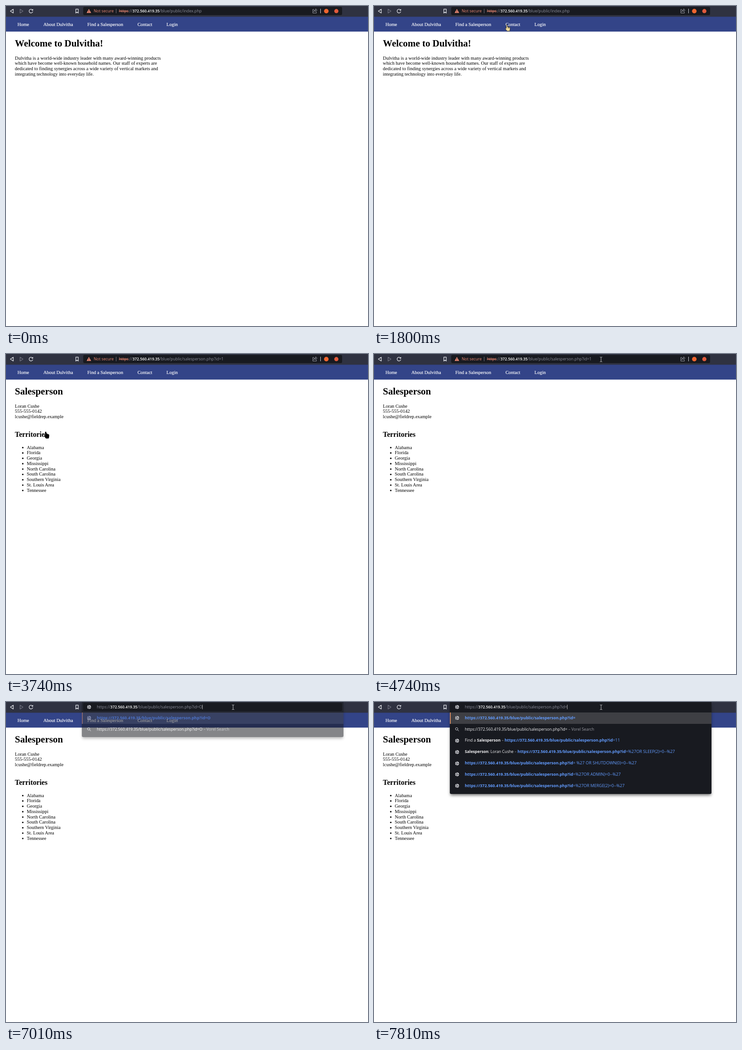
An HTML page that plays this animation: 797x703 px, repeating every 8000 ms.

```html
<!DOCTYPE html>
<html lang="en">
<head>
<meta charset="utf-8">
<title>Browser session</title>
<style>
html, body { margin: 0; width: 100%; height: 100%; overflow: hidden; background: #fff; }
[hidden] { display: none !important; }
#stage { position: relative; width: 797px; height: 703px; overflow: hidden; background: #fff; white-space: nowrap; }
#stage > *, #sheet > *, .abs { position: absolute; }

/* The web page is laid out at normal size and shown scaled down. */
#sheet { left: 0; top: 0; width: 1220px; height: 1080px; transform: scale(.654); transform-origin: 0 0;
  font: 16px/18px "Liberation Serif", serif; color: #000; }
#bar { left: 0; top: 0; width: 100%; height: 36px; background: #2f3241; }
#nav { left: 0; top: 30px; width: 100%; height: 56px; background: #334488; color: #fff; -webkit-text-stroke: .25px #fff; }
#nav span { position: relative; top: 23px; margin-left: 48px; }
#nav span:first-child { margin-left: 38.5px; }

.page { left: 30px; top: 107.44px; }
h1 { font-size: 32px; line-height: 37px; margin: 0 0 21.44px; }
h2 { font-size: 24px; line-height: 27px; margin: 19.92px 0; }
p { margin: 0 0 16px; }
ul { margin: 0; padding-left: 40px; }
.states ul { list-style: square; margin-bottom: 16px; }
u { color: #00e; }

.ui { font: 8.75px/12px "Open Sans", sans-serif; }
#popup { left: 167px; top: 0; width: 576px; background: #181a20; padding: 22.8px 0 5px;
  box-sizing: border-box; box-shadow: 0 4px 6px -1px rgba(0,0,0,.55); border-radius: 0 0 3px 3px; }
.row { position: relative; height: 24.85px; line-height: 24.85px; padding-left: 33px; color: #f2f2f4; font-size: 8.68px; }
.row:first-child { background: #3e3f44; box-shadow: inset 2px 0 #cf875e; }
.row svg { position: absolute; left: 10.5px; top: 7.4px; }
.row em { font-style: normal; color: #9a9ba3; }
.row q { quotes: none; color: #639cff; font-size: 9.1px; }
.row q b { font-size: 8.85px; }
#field { left: 170px; top: 2px; width: 570px; height: 18px; box-sizing: border-box;
  background: #181a20; border-radius: 3px; }
#field.focus { box-shadow: inset 0 0 0 1.2px #a3442f; }
#url { top: 3px; color: #8d8f9b; }
#url .host { color: #fff; font-size: 8.4px; font-weight: 600; }
#url.warn .scheme { color: #ee8a74; text-decoration: line-through; }
#url .picked, #url .picked span { background: #1b5fc1; color: #fff; }
#caret { display: inline-block; width: .7px; height: 10px; margin-right: -.7px; vertical-align: -2px; background: #aaa; }
#cursor { left: 0; top: 0; overflow: visible; }
</style>
</head>
<body>
<div id="stage">
  <div id="sheet">
    <div id="nav"></div>
    <div id="bar"></div>
    <div id="home" class="page">
      <h1>Welcome to Dulvitha!</h1>
      <p>Dulvitha is a world-wide industry leader with many award-winning products<br>
      which have become well-known household names. Our staff of experts are<br>
      dedicated to finding synergies across a wide variety of vertical markets and<br>
      integrating technology into everyday life.</p>
    </div>
    <div id="list" class="page states">
      <h1>Find a Salesperson</h1>
      <p>Use the list below to find a salesperson nearby. We are ready to serve you!</p>
      <p><b>UNITED STATES</b></p>
    </div>
    <div id="person" class="page">
      <h1>Salesperson</h1>
      <div>Loran Cushe<br>555-555-0142<br>lcushe@fieldrep.example<br><br></div>
      <h2>Territories</h2>
      <ul id="areas"></ul>
    </div>
  </div>

  <div id="popup" class="ui"></div>
  <svg id="tools" width="170" height="24" fill="none" stroke="#eceef4" stroke-width="1.2" stroke-linejoin="round">
    <path d="M16 7v8.4L9.5 11.2z"/>
    <path d="M31 7v8.4l6.5-4.2z" stroke="#737583"/>
    <g id="reload"><path d="M58.2 8.6A4.1 4.1 0 1 0 59 12"/><path d="M59.6 6.5v3.6H56z" fill="#eceef4" stroke="none"/></g>
    <path id="stop" d="M51.5 7.5l7 7m0-7l-7 7"/>
    <path d="M153.7 6.8h5.4v8.8l-2.7-2.2-2.7 2.2z"/>
  </svg>
  <div id="field" class="ui">
    <div id="security" class="abs" style="left:0;top:0">
      <svg class="abs" style="left:7px;top:4px" width="11" height="10"><path d="M5.5 .5L10.5 9.3H.5z" fill="#ee8a74"/><path d="M5.5 3.5v2.7m0 .8v1.1" stroke="#181a20"/></svg>
      <span class="abs" style="left:23px;top:3px;color:#ee8a74">Not secure</span>
      <i class="abs" style="left:72px;top:4px;width:1px;height:10px;background:#6d6f7a"></i>
    </div>
    <span id="globe" class="abs" style="left:7.5px;top:4px"></span>
    <div id="url" class="abs"><span id="urlText"><span class="scheme">https</span>://<span class="host"></span><span id="path"></span><span id="tail"></span></span><i id="caret"></i></div>
    <svg id="actions" class="abs" style="left:500px;top:0" width="70" height="18" fill="none" stroke="#a9abb5">
      <path d="M8 5.5H5.5v8h8V11M7.5 10.5q.3-4 4.3-4.3V4l3 3.2-3 3.2V8.2q-2.5 0-4.3 2.3z" stroke-width=".9"/>
      <path d="M22.5 4v10" stroke="#d3d4da"/>
      <circle cx="35.2" cy="9.2" r="5" fill="#f0652f" stroke="none"/>
      <circle cx="57.3" cy="9.2" r="4.6" fill="#e05a3c" stroke="none"/>
    </svg>
  </div>
  <svg id="cursor" width="1" height="1">
    <path id="arrow" d="M0 0v11l2.5-2.3 1.9 4.3 2-.9-1.9-4.1H8z" fill="#000" stroke="#fff" stroke-width=".5"/>
    <path id="hand" d="M-.8 8V1.2a1.2 1.2 0 0 1 2.4 0V4.5l4.8 1.1q1.5.4 1.4 2l-.3 3.4q-.2 1.6-.9 3.2H.9Q-1.2 11.5-3 8.8q.6-1.6 2.2-.8zM3.4 5v3M5.4 5.5v2.7" stroke-width=".8" stroke-linejoin="round"/>
    <path id="beam" d="M-2.5-5.2q2 0 2.5.8.5-.8 2.5-.8M0-4.5v9M-2.5 5.2q2 0 2.5-.8.5.8 2.5.8" fill="none" stroke="#d8d8dc" stroke-width=".9"/>
  </svg>
</div>
<script>
const $ = id => document.getElementById(id);
const LOOP = 8000, FRAME = 200 / 3;
const HOST = '372.560.419.35';
const PERSON_PATH = '/blue/public/salesperson.php?id=';

// ---- static content
$('nav').innerHTML = ['Home', 'About Dulvitha', 'Find a Salesperson', 'Contact', 'Login']
  .map(s => `<span>${s}</span>`).join('');
document.querySelector('.host').textContent = HOST;

const states = `Alabama (AL):Loran Cushe
Alaska (AK):Walter Renholds
Arizona (AZ):Edith Porvig
Arkansas (AR):Henrietta Quind
California (CA):Northern California>Walter Renholds:Southern California>Phoebe Lastrin
Colorado (CO):Edith Porvig
Connecticut (CT):Matilda Fenbrock
Delaware (DE):Matilda Fenbrock
Florida (FL):Loran Cushe
Georgia (GA):Loran Cushe
Hawaii (HI):Edith Porvig
Idaho (ID):Edith Porvig
Illinois (IL):Chicago Metro>Phoebe Lastrin:Outside Chicago>Lew Tindal
Indiana (IN):Conrad Dreske
Iowa (IA):Lew Tindal`;
$('list').innerHTML += states.split('\n').map(line => {
  const [state, ...reps] = line.split(':');
  const items = reps.map(rep => {
    const parts = rep.split('>'), name = `<u>${parts.pop()}</u>`;
    return `<li>${[...parts, name].join('<br>')}</li>`;
  });
  return `${state}<ul>${items.join('')}</ul>`;
}).join('');
$('areas').innerHTML = ['Alabama', 'Florida', 'Georgia', 'Mississippi', 'North Carolina',
  'South Carolina', 'Southern Virginia', 'St. Louis Area', 'Tennessee']
  .map(s => `<li>${s}</li>`).join('');

// ---- address suggestions
const GLOBE = `<svg width="10" height="10"><circle cx="5" cy="5" r="4.3" fill="#d9dade"/>
  <path d="M1 5l3 .4 1 1.7-1.2 2M4.5 1l-.6 2 2 .9 1 2 2-.6" fill="none" stroke="#30323a" stroke-width="1.1"/></svg>`;
const LENS = `<svg width="10" height="10" fill="none" stroke="#c9cad0"><circle cx="4" cy="4" r="2.7"/><path d="M6 6l3 3"/></svg>`;
$('globe').innerHTML = GLOBE;

const row = (icon, html) => `<div class="row">${icon}${html}</div>`;
const address = rest => `<q><b>https://${HOST}${PERSON_PATH.slice(0, -1)}</b>=${rest}</q>`;
function suggestions(typed, count) {
  return [
    row(GLOBE, `<q><b>https://${HOST}${PERSON_PATH}${typed}</b></q>`),
    row(LENS, `https://${HOST}${PERSON_PATH}${typed} <em>– Vorel Search</em>`),
    row(GLOBE, `Find a <b>Salesperson</b> <em>–</em> ${address('11')}`),
    row(GLOBE, `<b>Salesperson</b>: Loran Cushe <em>–</em> ${address('%27OR SLEEP(2)=0--%27')}`),
    row(GLOBE, address(' %27 OR SHUTDOWN(0)=0--%27')),
    row(GLOBE, address('%27OR ADMIN)=0--%27')),
    row(GLOBE, address('%27OR MERGE(2)=0--%27'))
  ].slice(0, count).join('');
}

// ---- timeline: each step changes part of the state
const steps = [
  [0, { page: 'home', path: '/blue/public/index.php', tail: '', loading: false, focus: false,
        pick: '', typing: false, rows: 0, fade: 1 }],
  [2260, { loading: true }],
  [2400, { loading: false, page: 'list', path: '/blue/public/territories.php' }],
  [3410, { loading: true }],
  [3540, { loading: false, page: 'person', path: PERSON_PATH, tail: '1' }],
  [4810, { focus: true }],
  [4940, { pick: 'all' }],
  [5080, { pick: 'caret' }],
  [5350, { pick: 'all' }],
  [5410, { pick: 'tail' }],
  [7010, { pick: 'caret', focus: false, typing: true, tail: 'O', rows: 2, fade: .53 }],
  [7080, { fade: 1 }],
  [7680, { tail: '' }],
  [7810, { rows: 7 }]
];

// ---- pointer: time, x, y, shape
const track = [
  [130, 758, 692, 'arrow'], [270, 610, 505, 'arrow'], [400, 465, 322, 'arrow'], [530, 382, 208, 'arrow'],
  [660, 348, 161, 'arrow'], [730, 348, 161, 'arrow'], [930, 301, 59, 'arrow'], [1060, 301, 59, 'arrow'],
  [1130, 304, 48, 'hand'], [1400, 301, 43, 'hand'], [1790, 292, 41, 'hand'], [1930, 292, 41, 'hand'],
  [2000, 276, 42, 'arrow'], [2060, 256, 41, 'hand'], [2260, 222, 38, 'hand'], [2540, 222, 38, 'hand'],
  [2600, 216, 57, 'arrow'], [2860, 97, 180, 'arrow'], [3000, 92, 187, 'arrow'], [3140, 88, 175, 'hand'],
  [3340, 87, 171, 'hand'], [3800, 87, 171, 'hand'], [3870, 92, 172, 'arrow'], [4070, 130, 176, 'arrow'],
  [4200, 239, 165, 'arrow'], [4270, 385, 118, 'arrow'], [4340, 491, 77, 'arrow'], [4410, 491, 77, 'arrow'],
  [4480, 497, 52, 'arrow'], [4610, 499, 20, 'beam'], [4740, 500, 11.5, 'beam'], [LOOP, 500, 11.5, 'beam']
];

function drawCursor(t) {
  $('cursor').style.display = t < 130 ? 'none' : '';
  if (t < 130) return;
  const held = Math.max(130, Math.floor((t + 4) / FRAME) * FRAME);
  const next = Math.max(1, track.findIndex(k => k[0] > held));
  const [a, b] = [track[next - 1], track[next]];
  const f = (held - a[0]) / (b[0] - a[0]);
  const x = a[1] + (b[1] - a[1]) * f, y = a[2] + (b[2] - a[2]) * f;
  $('cursor').style.transform = `translate(${x}px, ${y}px)`;
  for (const shape of ['arrow', 'hand', 'beam']) $(shape).style.display = shape === a[3] ? '' : 'none';
  const overNav = y < 56;
  $('hand').setAttribute('fill', overNav ? '#ecd89a' : '#000');
  $('hand').setAttribute('stroke', overNav ? '#14161f' : '#000');
}

let shown = -1;
function drawState(t) {
  const current = steps.filter(s => s[0] <= t).length;
  if (current === shown) return;
  shown = current;
  const s = Object.assign({}, ...steps.slice(0, current).map(step => step[1]));

  for (const id of ['home', 'list', 'person']) $(id).hidden = id !== s.page;
  $('reload').style.display = s.loading ? 'none' : '';
  $('stop').style.display = s.loading ? '' : 'none';

  $('path').textContent = s.path;
  $('tail').textContent = s.tail;
  $('tail').className = s.pick === 'tail' ? 'picked' : '';
  $('urlText').className = s.pick === 'all' ? 'picked' : '';
  $('caret').hidden = s.pick !== 'caret';
  $('url').className = s.typing ? 'abs' : 'abs warn';
  $('url').style.left = s.typing ? '30px' : '78.7px';
  $('field').className = s.focus ? 'ui focus' : 'ui';
  $('security').hidden = s.typing;
  $('globe').hidden = !s.typing;
  $('actions').style.display = s.typing ? 'none' : '';

  $('popup').hidden = !s.rows;
  $('popup').style.opacity = s.fade;
  $('popup').innerHTML = suggestions(s.tail, s.rows);
}

const start = performance.now();
function tick() {
  const t = (performance.now() - start) % LOOP;
  drawState(t);
  drawCursor(t);
  requestAnimationFrame(tick);
}
tick();
</script>
</body>
</html>
```
